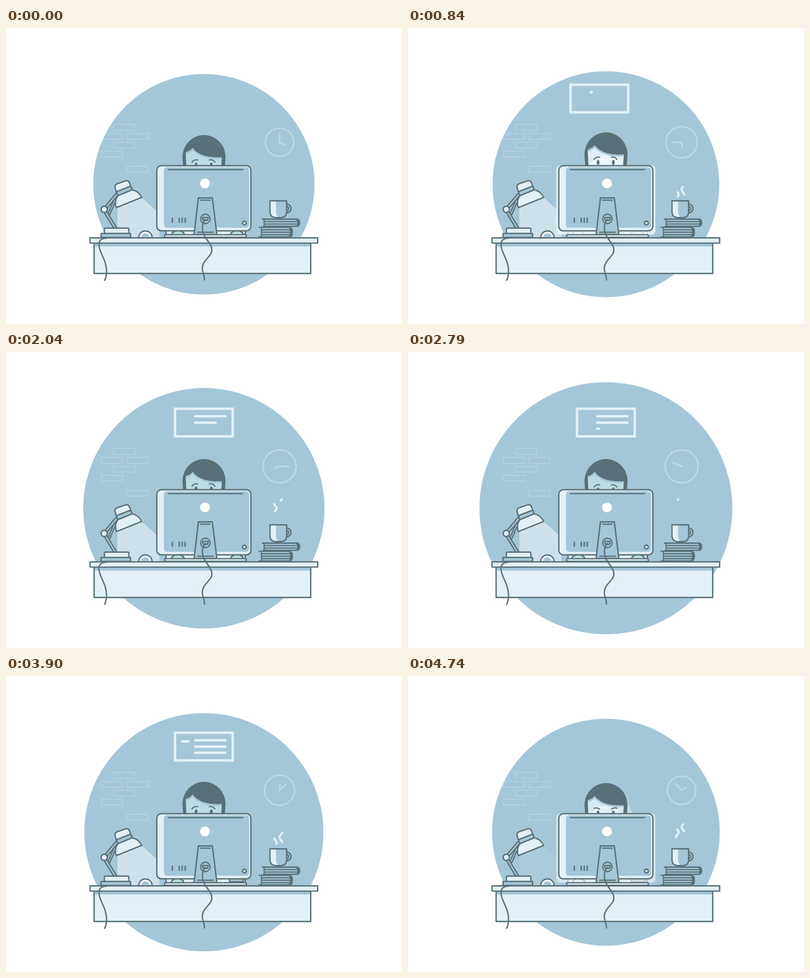
Write an HTML page that moves like this. It is 800 px wide and 600 px high and loops after 4770 ms.

```html
<!DOCTYPE html>
<html lang="en">
<head>
<meta charset="utf-8">
<title>Desk at work</title>
<style>
  html, body { margin: 0; width: 100%; height: 100%; overflow: hidden; background: #fff; }
  svg { display: block; width: 100%; height: 100%; }
  .ink { stroke: #587077; stroke-width: 2.7; stroke-linecap: round; stroke-linejoin: round; }
  .fine { stroke-width: 2.3; }
  .flat { stroke: none; }
  .blue { fill: #a3c6d9; }
  .pale { fill: #e2f1f7; }
  .dark { fill: #587077; }
  .none { fill: none; }
  .wall { fill: none; stroke: #e2f1f7; stroke-linecap: round; stroke-linejoin: round; }
</style>
</head>
<body>
<svg viewBox="0 0 800 600">
  <clipPath id="clip"><circle id="clipDisc" cx="399.8" cy="316.7"/></clipPath>
  <circle id="disc" class="blue" cx="399.8" cy="316.7"/>
  <g id="bricks" class="wall" stroke-width="2.6" opacity=".22"></g>

  <g clip-path="url(#clip)">
    <g id="board" class="wall" stroke-width="5">
      <rect x="341.5" y="115" width="116.5" height="56" stroke-linejoin="miter"/>
      <path id="rows"/>
    </g>
  </g>

  <g class="wall" stroke-width="3.2" opacity=".43">
    <circle id="clock" cx="552.7" cy="231.7"/>
    <path id="hands"/>
  </g>

  <path id="steam" class="wall" stroke-width="4.2"/>

  <path id="cone" d="M225 363 L273 343 L310 376 V425 H225 Z" fill="#cee1eb"/>
  <path id="wedge" class="pale" d="M440 240 L454 281 H438 Z"/>

  <g id="head">
    <path class="dark" d="M359 296 L356.5 262 A43.5 45 0 0 1 443.5 262 L441 296 Z"/>
    <path id="face" d="M363 252 Q373 249 377 243 C388 258 410 264 436 262 L434 296 H365 Z"/>
    <ellipse id="shine" cx="400" cy="291" rx="35" ry="28" fill="#f3fafc"/>
    <path class="blue" d="M363 252 Q373 249 377 243 C388 258 410 264 436 262 V265 C412 268 390 262 377.5 248 Q372 253 363 256 Z"/>
    <g id="look">
      <ellipse class="dark" cx="384" cy="278" rx="2.8" ry="5.3"/>
      <ellipse class="dark" cx="414.8" cy="278" rx="2.8" ry="5.3"/>
      <path id="brows" class="ink fine none"/>
    </g>
  </g>

  <rect class="ink pale" x="323.3" y="405" width="160" height="17"/>
  <path id="fistL" class="ink" d="M0 421 A13.5 10.5 0 0 1 27 421 Z"/>
  <path id="fistR" class="ink" d="M0 421 A13.5 10.5 0 0 1 27 421 Z"/>
  <rect id="palm" class="ink blue" x="451.5" y="411" width="28" height="6"/>
  <rect id="glow" x="299.5" y="279" width="200.5" height="140" rx="8" fill="#eaf5f8"/>

  <!-- lamp -->
  <g class="ink">
    <g fill="none">
      <path d="M208 377 L220 349" stroke-width="6.6"/>
      <path d="M208 377 L220 349" stroke="#a3c6d9" stroke-width="1.8"/>
      <path d="M201 373 L221 406 M200 366 L226 335" stroke-width="7.9"/>
      <path d="M201 373 L221 406 M200 366 L226 335" stroke="#a3c6d9" stroke-width="2.8"/>
    </g>
    <circle class="pale" cx="198.5" cy="367.7" r="6.3"/>
    <path class="pale" d="M223 332 L220.3 324 Q218.8 318.5 224 316 L242 309.8 Q247 308.5 249 313 L252 320.5 Z"/>
    <path class="blue" d="M223 332 L252 320.5 L255 328 L226 340 Z"/>
    <path class="pale" d="M226 340 C221 347 220 356 223 364 L274 343.5 C271 336 264 330 255 328 Z"/>
    <path class="pale" d="M198.8 416.5 V408 Q198.8 405.7 201 405.7 H246 Q248.2 405.7 248.2 408 V416.5 Z"/>
    <rect class="blue" x="192" y="416.5" width="59.7" height="8"/>
  </g>

  <path class="ink" fill="#fff" d="M268 425 A13.6 13.6 0 0 1 295.2 425 Z"/>
  <path class="blue" d="M273.5 424 A8 8 0 0 1 289.7 424 Z"/>

  <!-- monitor -->
  <g class="ink">
    <rect class="pale" x="320.5" y="419" width="165" height="5.3" rx="2"/>
    <rect class="pale" x="304.7" y="279.2" width="190" height="132" rx="9"/>
    <rect class="blue flat" x="319" y="282.5" width="172" height="122.5" rx="6"/>
    <path class="none" d="M328 287 H478 M336 385.5 V393.8 M350 385.5 V393.8 M356 385.5 V393.8 M362 385.5 V393.8"/>
    <circle class="flat" cx="402" cy="315" r="10" fill="#fff"/>
    <circle class="pale" cx="481.6" cy="395.4" r="3.7"/>
    <path class="blue" d="M388.7 344.3 H416.8 L426 418.5 H380 Z"/>
    <path class="none fine" d="M393 349 H412.5 M387 414 H419"/>
    <circle class="none fine" cx="402.8" cy="387" r="9.5"/>
    <path class="blue" d="M397.5 384 H408.3 V386 Q408.3 390 404.5 390 H401.3 Q397.5 390 397.5 386 Z"/>
  </g>

  <!-- books and mug -->
  <g class="ink">
    <path class="blue" d="M518 387.4 H587 Q593 387.4 593 394.7 Q593 402 587 402 H520"/>
    <path class="dark fine" d="M588 388 Q593 389 593 394.7 Q593 401 588 402 Q590.5 395 588 388 Z"/>
    <path class="none fine" d="M521.5 388 V402 M522 392.3 H587 M522 397.4 H587"/>
    <path class="blue" d="M511.5 404 H572.5 Q578.3 404 578.3 413.7 Q578.3 423.5 572.5 423.5 H511.5"/>
    <path class="dark fine" d="M573.5 405 Q578.3 406 578.3 413.7 Q578.3 422 573.5 423 Q576 414 573.5 405 Z"/>
    <path class="none fine" d="M516 404 V423 M516 409 H573 M516 414 H573 M516 419 H573"/>
    <path class="blue" d="M567 357 A8.8 8.8 0 0 1 567 374.6"/>
    <path class="none fine" d="M567.5 361.7 A4.2 4.2 0 0 1 567.5 370"/>
    <path class="blue" d="M533.4 350.4 H567 V372 Q567 384.3 555 384.3 H546 Q533.4 384.3 533.4 372 Z"/>
    <path class="pale flat" d="M534.7 351.7 H545.5 V372 Q545.5 380 550 383 H546 Q534.7 383 534.7 372 Z"/>
  </g>

  <!-- desk and cables -->
  <rect class="pale" x="178" y="436" width="437.6" height="61.7"/>
  <rect class="blue" x="178" y="436" width="437.6" height="7"/>
  <g class="ink">
    <rect class="none" x="178" y="436" width="437.6" height="61.7"/>
    <rect class="pale" x="169.8" y="425.3" width="459.8" height="10.7"/>
    <path class="none" d="M204 426 C191 426 187.5 432 187.8 440 C188.5 456 203.5 470 203.2 495 Q203 504 199.3 511.5"/>
    <path class="none" d="M403 388 C395 395 395 412 402 423 C408 433 416 440 416 450 C416 463 397 470 396.5 487 C396.5 497 401 499 401 510.7"/>
  </g>
</svg>
<script>
const LOOP = 4770, PEAK = 2880;
const $ = id => document.getElementById(id);
const set = (id, name, value) => $(id).setAttribute(name, value);
const mix = (a, b, k) => a + (b - a) * k;
const ramp = (t, a, b) => Math.max(0, Math.min(1, (t - a) / (b - a)));
const smooth = k => k * k * (3 - 2 * k);
const easeOut = (k, p) => 1 - (1 - k) ** p;
const wave = (t, period) => Math.cos(2 * Math.PI * t / period);
// Soft bump of height 1 around a moment
const pulse = (t, mid, half) => (1 + Math.cos(Math.PI * Math.min(1, Math.abs(t - mid) / half))) / 2;

const discRadius = t => t < PEAK
  ? mix(223.5, 257, (t / PEAK) ** 1.47)
  : mix(257, 230, ramp(t, PEAK, 4740) ** .93);

// A wavy strand whose two ends climb at different paces
function puff(t, x, low, start, end, lag) {
  const k = ramp(t % 2890, start, end);
  if (k === 0 || k === 1) return '';
  const top = mix(low, 298, easeOut(k, 1.35)), bottom = mix(low, 298, k ** lag);
  let d = '';
  for (let i = 0; i <= 16; i++) {
    const y = mix(bottom, top, i / 16);
    d += `${i ? 'L' : 'M'}${x - 2.7 * Math.cos(Math.PI * (y - 327) / 10.4)} ${y}`;
  }
  return d;
}

function row(t, x, y, full, start) {
  const length = Math.min(full, (t - start) * .11);
  return length > 0 ? `M${x} ${y}h${length}` : '';
}

function hand(turn, length) {
  const a = turn * Math.PI / 180;
  return `${552.7 + length * Math.sin(a)} ${231.7 - length * Math.cos(a)}`;
}

function drawWall(t) {
  const r = discRadius(t);
  set('disc', 'r', r);
  set('clipDisc', 'r', r);

  const enter = ramp(t, 500, 1000), leave = ramp(t, 4300, 4700);
  set('board', 'transform', `translate(${130 * (leave ** 3 - (1 - enter) ** 2)})`);
  set('board', 'opacity', Math.min(1, enter * 2, (1 - leave) * 2));
  set('rows', 'd', row(t, 382.3, 130.3, 61, 822) + row(t, 382.3, 143.3, 61, 1668)
    + row(t, 382.3, 155.4, 61, 2763) + row(t, 355.7, 132.5, 12.8, 3780));

  const swell = easeOut(ramp(t, 0, 2400), 2.4) - smooth(ramp(t, 2700, 4740));
  set('clock', 'r', 28.7 + 4.7 * swell);
  set('hands', 'd', `M${hand(.75 * t, 18.5)}L552.7 231.7L${hand(120 + .0625 * t, 11.5)}`);
  set('steam', 'd', puff(t, 544, 343, 420, 2830, 2) + puff(t, 555.3, 338, 250, 2080, 4));
}

function drawPerson(t) {
  const light = .9 * (pulse(t, 960, 720) + pulse(t, 5000, 720));
  const skin = `rgb(${mix(187, 228, light)} ${mix(220, 242, light)} ${mix(227, 247, light)})`;
  set('glow', 'opacity', light);
  set('shine', 'opacity', light * .8);
  ['face', 'fistL', 'fistR'].forEach(id => set(id, 'fill', skin));
  set('cone', 'opacity', 1 - .85 * ramp(t, 4400, 4740));
  set('wedge', 'opacity', .45 * ramp(t, 4500, 4740));

  const rise = pulse(t, 840, 260) + pulse(t, 4038, 260);
  set('head', 'transform', `translate(0 ${-5.5 * rise})`);
  set('look', 'transform', `translate(0 ${2 * pulse(t, PEAK, 500)})`);
  const frown = ramp(t, 4400, 4600);
  const outer = mix(272, 268.3, frown), inner = mix(267.5, 269.8, frown);
  set('brows', 'd', `M375.7 ${outer}Q380 266 387.3 ${inner}M410.7 ${inner}Q418 266 422 ${outer}`);

  const flat = t >= 3600;
  set('fistL', 'transform', `translate(${332 + 2 * wave(t, 88.3)})`);
  set('fistR', 'transform', `translate(${451 + 2 * wave(t, 157)})`);
  set('fistR', 'visibility', flat ? 'hidden' : 'visible');
  set('palm', 'visibility', flat ? 'visible' : 'hidden');
}

function draw(t) {
  drawWall(t);
  drawPerson(t);
}

$('bricks').innerHTML = [[217.5, 195.5], [192, 213.7], [244, 213.7], [217.5, 231.7], [192, 249.8], [244, 280.3]]
  .map(([x, y]) => `<rect x="${x}" y="${y}" width="43" height="11.7" stroke-linejoin="miter"/>`).join('');

const begin = performance.now();
function tick() {
  draw((performance.now() - begin) % LOOP);
  requestAnimationFrame(tick);
}
draw(0);
requestAnimationFrame(tick);
</script>
</body>
</html>
```
